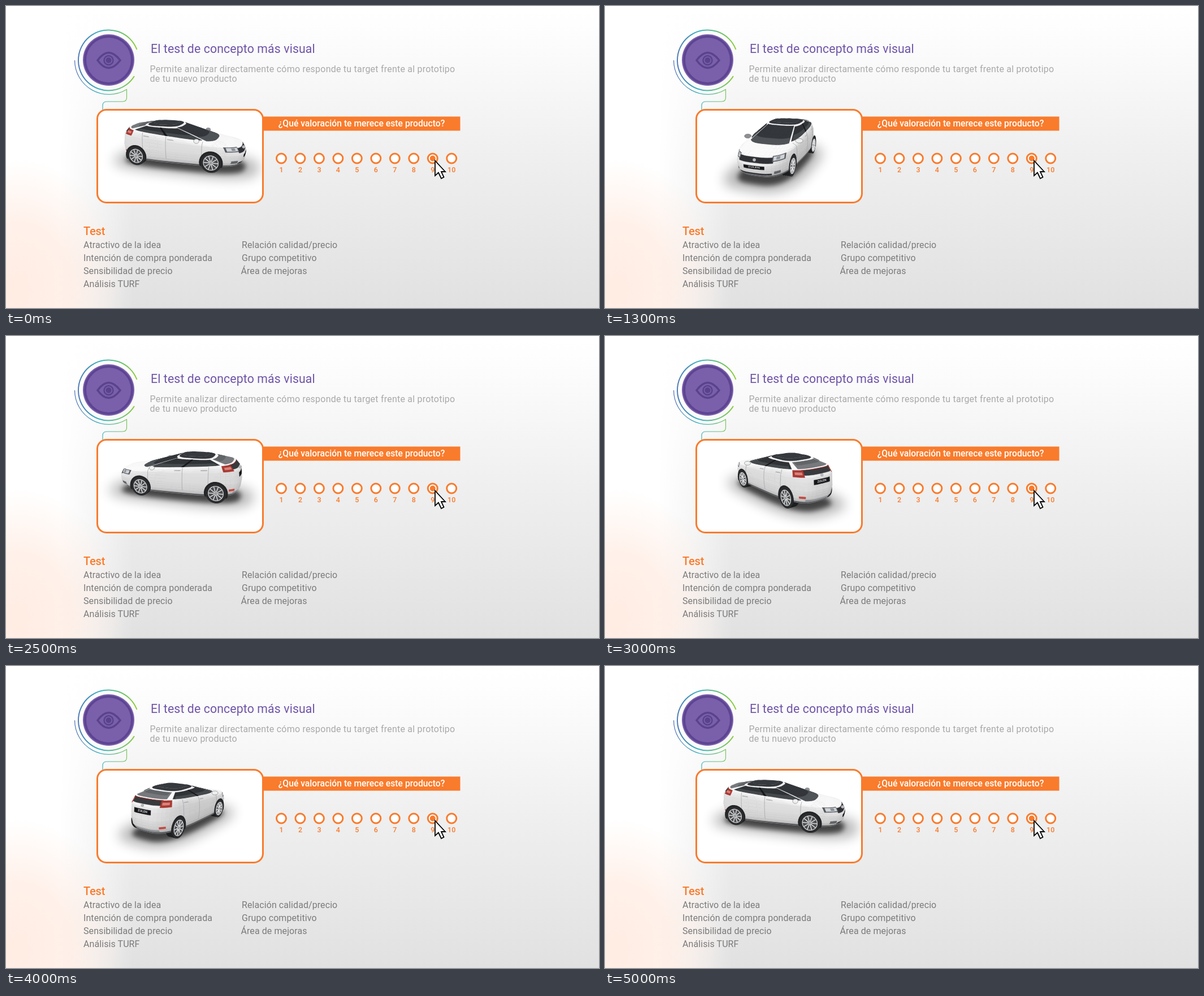
An HTML page for the animation above (5100 ms loop, 1049 px wide and 534 px high).

```html
<!DOCTYPE html>
<html lang="es">
<head>
<meta charset="utf-8">
<title>Test de concepto</title>
<style>
  html, body { margin: 0; width: 100%; height: 100%; overflow: hidden; background: #fff; }
  svg { display: block; width: 100%; height: 100%; font-family: Roboto, "Open Sans", sans-serif; }
  .list { font-size: 16px; fill: #7b7b7b; letter-spacing: .08px; }
  .intro { font-size: 16px; fill: #a9a9a9; letter-spacing: .22px; }
  .num { font-size: 12.5px; fill: #f97b2c; text-anchor: middle; font-weight: 500; }
</style>
</head>
<body>
<svg viewBox="0 0 1049 534">
  <defs>
    <linearGradient id="back" x2="0" y2="1">
      <stop offset="0" stop-color="#fff"/><stop offset=".06" stop-color="#fefefe"/>
      <stop offset=".5" stop-color="#efefef"/><stop offset="1" stop-color="#e1e1e1"/>
    </linearGradient>
    <linearGradient id="fade" gradientUnits="userSpaceOnUse" x1="95" x2="225">
      <stop offset="0" stop-color="#fff"/><stop offset="1" stop-color="#fff" stop-opacity="0"/>
    </linearGradient>
    <radialGradient id="glow">
      <stop offset="0" stop-color="#ffe9de" stop-opacity=".85"/>
      <stop offset=".5" stop-color="#ffe9de" stop-opacity=".65"/>
      <stop offset="1" stop-color="#ffeade" stop-opacity="0"/>
    </radialGradient>
    <linearGradient id="arc" gradientUnits="userSpaceOnUse" x1="121" x2="232">
      <stop offset="0" stop-color="#5070b4"/><stop offset=".42" stop-color="#40b4c0"/><stop offset="1" stop-color="#8dcb35"/>
    </linearGradient>
    <filter id="soft" x="-50%" y="-80%" width="200%" height="260%"><feGaussianBlur stdDeviation="4"/></filter>
    <filter id="wide" x="-50%" y="-80%" width="200%" height="260%"><feGaussianBlur stdDeviation="11"/></filter>
    <clipPath id="inside"><rect x="163" y="185" width="290" height="161" rx="14"/></clipPath>
  </defs>

  <rect width="1049" height="534" fill="url(#back)"/>
  <rect width="225" height="534" fill="url(#fade)"/>
  <ellipse cx="20" cy="500" rx="190" ry="230" fill="url(#glow)"/>

  <g fill="none" stroke="url(#arc)">
    <path d="M231.500 77A53.500 53.500 0 1 0 227 124" stroke-width="2"/>
    <path d="M121.500 96A60.500 60.500 0 0 0 213.500 147.500V162Q213.500 169 206 169H178Q171 169 171 176V183" stroke-width="1.200"/>
  </g>
  <circle cx="181.500" cy="95.500" r="45.500" fill="#7a5fab"/>
  <circle cx="181.500" cy="95.500" r="41.500" fill="none" stroke="#5d4492" stroke-width="4"/>
  <g fill="none" stroke="#5a438d" stroke-width="3.500">
    <path d="M162 96Q181.500 69 202 96Q181.500 123 162 96Z"/>
    <circle cx="181.500" cy="96" r="8" stroke-width="2.500"/>
  </g>
  <circle cx="181.500" cy="96" r="5" fill="#5a438d"/>

  <text x="256" y="83" font-size="21.300" letter-spacing=".1" fill="#6f54a8">El test de concepto más visual</text>
  <text class="intro" x="254.500" y="116.500">Permite analizar directamente cómo responde tu target frente al prototipo</text>
  <text class="intro" x="254.500" y="133.500">de tu nuevo producto</text>

  <rect x="161.500" y="183.500" width="293" height="164" rx="16" fill="#fff"/>
  <g id="car" clip-path="url(#inside)"></g>
  <rect x="161.500" y="183.500" width="293" height="164" rx="16" fill="none" stroke="#f97b2c" stroke-width="3"/>
  <rect x="455" y="195.500" width="348.500" height="25" fill="#f97b2c"/>
  <text x="629" y="213" font-size="15.700" font-weight="500" fill="#fff" text-anchor="middle">¿Qué valoración te merece este producto?</text>

  <g id="scale"></g>
  <circle cx="754.800" cy="269.500" r="5" fill="#f97b2c"/>
  <path d="M759 273.500V300L765 294.500L770 305L774.500 302.500L770 293H777Z" fill="#fff" stroke="#000" stroke-width="1.800"/>

  <text x="137" y="405" font-size="20" font-weight="500" letter-spacing="-.2" fill="#f97b2c">Test</text>
  <g class="list">
    <text x="137" y="428">Atractivo de la idea</text>
    <text x="137" y="451">Intención de compra ponderada</text>
    <text x="137" y="473.500">Sensibilidad de precio</text>
    <text x="137" y="496.500">Análisis TURF</text>
    <text x="417" y="428">Relación calidad/precio</text>
    <text x="417" y="451">Grupo competitivo</text>
    <text x="415.500" y="473.500">Área de mejoras</text>
  </g>
</svg>
<script>
const car = document.getElementById('car');
const rad = Math.PI / 180;

document.getElementById('scale').innerHTML = Array.from({ length: 10 }, (_, i) => {
  const x = 487 + 33.47 * i;
  return `<circle cx="${x}" cy="269.500" r="8.500" fill="#fff" stroke="#f97b2c" stroke-width="3"/>
    <text class="num" x="${x}" y="294">${i + 1}</text>`;
}).join('');

// Horizontal outlines of the body, low to high: rear x, front x, half width, rear z, front z
const rings = [
  [-1.92, 2.05, .80, .20, .19],
  [-2.05, 2.20, .88, .38, .34],
  [-2.08, 2.22, .91, .62, .58],
  [-2.03, 2.08, .90, 1.02, .82],
  [-1.84, 1.32, .84, 1.23, .95],
  [-1.20, .05, .60, 1.34, 1.34],
  [-.95, -.12, .44, 1.39, 1.39]
];
const POW = .62, FOCUS = 490, DIST = 10, CX = 311, CY = 274.5;
const AXLE = .33, WHEEL = .33;
const tiltS = Math.sin(18.5 * rad), tiltC = Math.cos(18.5 * rad);
let turnS, turnC, out;

const root = n => Math.sign(n) * Math.abs(n) ** POW;

function ringAt(v) {
  v = Math.max(0, Math.min(6, v));
  const i = Math.min(5, Math.floor(v)), k = v - i;
  return rings[i].map((n, j) => n + (rings[i + 1][j] - n) * k);
}

// Body surface: angle 0 is the nose, 90 the right side; v runs through the rings
function surf(angle, v) {
  const [xr, xf, w, zr, zf] = ringAt(v);
  const c = root(Math.cos(angle * rad));
  return [(xr + xf) / 2 + (xf - xr) / 2 * c, w * root(Math.sin(angle * rad)), zr + (zf - zr) * (c + 1) / 2];
}

// Angle at which the outline at height v reaches length x
function angleAt(x, v) {
  const [xr, xf] = ringAt(v);
  const c = (2 * x - xr - xf) / (xf - xr);
  return Math.acos(Math.sign(c) * Math.min(1, Math.abs(c)) ** (1 / POW)) / rad;
}

function project([x, r, z]) {
  const sx = x * turnC - r * turnS, d = x * turnS + r * turnC;
  const s = FOCUS / (DIST - d * tiltC - z * tiltS);
  return [CX + s * sx, CY - s * (z * tiltC - d * tiltS), s];
}

const path = pts => 'M' + pts.map(p => p[0].toFixed(1) + ' ' + p[1].toFixed(1)).join('L') + 'Z';
const area = pts => pts.reduce((sum, p, i) => {
  const q = pts[(i + 1) % pts.length];
  return sum + p[0] * q[1] - q[0] * p[1];
}, 0);
const draw = (d, fill, extra = '') => { if (d) out += `<path d="${d}" fill="${fill}" ${extra}/>`; };

const quad = (a0, a1, v0, v1) => [[a0, v0], [a1, v0], [a1, v1], [a0, v1]].map(p => project(surf(...p)));

function patch(a0, a1, v0, v1, fill, n = 8) {
  let d = '';
  for (let i = 0; i < n; i++) for (let j = 0; j < 2; j++) {
    const q = quad(a0 + (a1 - a0) * i / n, a0 + (a1 - a0) * (i + 1) / n,
      v0 + (v1 - v0) * j / 2, v0 + (v1 - v0) * (j + 1) / 2);
    if (area(q) > 0) d += path(q);
  }
  draw(d, fill, `stroke="${fill}" stroke-width=".4"`);
}

function pair(a0, a1, ...rest) {
  patch(a0, a1, ...rest);
  patch(-a1, -a0, ...rest);
}

function shade(a, v) {
  const diff = (p, q) => p.map((n, i) => n - q[i]);
  const t = diff(surf(a + 5, v), surf(a - 5, v)), u = diff(surf(a, v + .3), surf(a, v - .3));
  const n = [t[1] * u[2] - t[2] * u[1], t[2] * u[0] - t[0] * u[2], t[0] * u[1] - t[1] * u[0]];
  const len = Math.hypot(...n) || 1;
  const near = n[0] * turnS + n[1] * turnC, side = n[0] * turnC - n[1] * turnS;
  const g = Math.round(Math.min(250, 198 + (50 * n[2] + 19 * near - 10 * side) / len));
  return `rgb(${g},${g},${g + 1})`;
}

function shell(v0, v1) {
  const step = 7.5, rise = 1 / 3;
  for (let v = v0; v < v1 - .01; v += rise) for (let a = 0; a < 360; a += step) {
    const q = quad(a, a + step, v, v + rise);
    if (area(q) <= 0) continue;
    const fill = shade(a + step / 2, v + rise / 2);
    draw(path(q), fill, `stroke="${fill}" stroke-width=".7"`);
  }
}

function seam(x, v0, v1) {
  for (const side of [1, -1]) {
    const a = angleAt(x, (v0 + v1) / 2) * side;
    if (area(quad(a - 1, a + 1, v0, v1)) <= 0) continue;
    const pts = [0, 1, 2, 3, 4].map(i => {
      const v = v0 + (v1 - v0) * i / 4;
      return project(surf(angleAt(x, v) * side, v));
    });
    draw(path(pts).slice(0, -1), 'none', 'stroke="#a4a6a8" stroke-width=".8"');
  }
}

function disc(x, r, size, floor = -1) {
  return Array.from({ length: 28 }, (_, i) => {
    const a = i / 28 * 2 * Math.PI;
    return project([x + size * Math.cos(a), r, Math.max(floor, AXLE + size * Math.sin(a))]);
  });
}

const wheels = [[1.22, 1], [1.22, -1], [-1.38, 1], [-1.38, -1]];

function tyres() {
  for (const [x, side] of wheels)
    for (const r of [.6, .67, .74, .81]) draw(path(disc(x, r * side, WHEEL)), '#1d1e20');
}

function rims() {
  for (const [x, side] of wheels) {
    const r = .855 * side, arch = disc(x, r, .385, .2);
    if (area(arch) * side >= 0) continue;
    draw(path(arch), '#232426');
    draw(path(disc(x, r, WHEEL)), '#2b2c2e');
    draw(path(disc(x, r, .24)), '#4b4d50', 'stroke="#cfd1d3" stroke-width="1.300"');
    let spokes = '';
    for (let i = 0; i < 10; i++) {
      const a = i * 36 * rad;
      const end = project([x + .23 * Math.cos(a), r, AXLE + .23 * Math.sin(a)]);
      spokes += path([project([x, r, AXLE]), end]);
    }
    draw(spokes, 'none', 'stroke="#dcddde" stroke-width="1.500"');
    draw(path(disc(x, r, .05)), '#9a9c9f');
  }
}

function mirrors(front) {
  for (const side of [1, -1]) {
    if ((side * turnC > 0) !== front) continue;
    const [x, y, s] = project([.75, .9 * side, 1.02]);
    const rx = s * (.07 + .05 * Math.abs(turnS));
    out += `<ellipse cx="${x}" cy="${y}" rx="${rx}" ry="${s * .07}" fill="${front ? '#efeff0' : '#8d8f92'}" stroke="#6b6d70" stroke-width=".6"/>`;
  }
}

function plate(a, v0, v1) {
  patch(a - 11, a + 11, v0, v1, '#17181a', 4);
  const q = quad(a - 11, a + 11, v0, v1);
  if (area(q) < 60) return;
  const mid = (p, r) => [(p[0] + r[0]) / 2, (p[1] + r[1]) / 2];
  const left = mid(q[1], q[2]), right = mid(q[0], q[3]), low = mid(q[0], q[1]), high = mid(q[2], q[3]);
  const c = mid(low, high);
  const m = [(right[0] - left[0]) / 40, (right[1] - left[1]) / 40, (low[0] - high[0]) / 11, (low[1] - high[1]) / 11, ...c];
  out += `<text transform="matrix(${m})" y="2.600" font-size="7.500" font-weight="700" fill="#d8d8d8" text-anchor="middle">ZULEN</text>`;
}

function badge(a, v, fill) {
  if (area(quad(a - 6, a + 6, v - .1, v + .1)) < 10) return;
  const [x, y] = project(surf(a, v));
  out += `<circle cx="${x}" cy="${y}" r="2.800" fill="${fill}"/>`;
}

function shadow(k, opacity, filter) {
  const pts = Array.from({ length: 36 }, (_, i) => {
    const [x, r] = surf(i * 10, 1);
    return project([x * k, r * (k * 2 - 1), 0]);
  });
  draw(path(pts), '#000', `opacity="${opacity}" filter="url(#${filter})"`);
}

function render(step) {
  const turn = (17 + 7.2 * step) * rad;
  turnS = Math.sin(turn);
  turnC = Math.cos(turn);
  out = '';
  shadow(1.22, .3, 'wide');
  shadow(1.02, .62, 'soft');
  tyres();
  mirrors(false);

  shell(0, 4);
  patch(0, 360, 0, .25, '#55575a', 48);
  for (const x of [.92, -.28, -1.12]) seam(x, .8, 3.95);
  for (const x of [-.22, -1.08]) pair(angleAt(x + .2, 3.4), angleAt(x, 3.4), 3.35, 3.45, '#aeb0b2', 2);
  // Nose
  patch(-25, 25, 2.25, 2.85, '#303236', 12);
  pair(23, 50, 2.42, 3.02, '#54575b');
  pair(25, 47, 2.52, 2.94, '#cfd3d7');
  pair(31, 38, 2.6, 2.88, '#8b9096', 3);
  patch(-24, 24, .5, .95, '#303235');
  pair(29, 42, .75, 1.2, '#616468', 4);
  plate(0, 1.5, 1.9);
  badge(0, 2.55, '#b9bbbe');
  // Tail
  patch(152, 208, 3.3, 3.94, '#393a3d', 12);
  pair(132, 153, 3.05, 3.94, '#a83a34');
  pair(136, 150, 3.35, 3.65, '#d8857d', 4);
  patch(150, 210, 3.92, 4, '#8f2f2b', 12);
  pair(142, 154, 1, 1.25, '#c4473d', 4);
  patch(155, 205, .3, .7, '#8b8d90');
  plate(180, 2.45, 2.8);
  badge(180, 3.1, '#b4b6b8');
  rims();

  shell(4, 6);
  patch(-42, 42, 4.03, 4.96, '#34373b', 14);
  patch(-42, 42, 4.03, 4.3, '#505458', 14);
  pair(48, 131, 4.08, 4.9, '#303337', 20);
  pair(52, 126, 4.08, 4.4, '#46494d', 20);
  pair(89.8, 90.2, 4.06, 4.9, '#17181a', 2);
  patch(144, 216, 4.1, 4.92, '#77797d', 14);
  patch(150, 210, 4.55, 4.92, '#626569', 14);
  patch(0, 360, 5.25, 6, '#36393d', 48);
  draw(path(Array.from({ length: 48 }, (_, i) => project(surf(i * 7.5, 6)))), '#36393d');
  mirrors(true);
  car.innerHTML = out;
}

let shown = -1;
function tick(now) {
  const step = Math.floor(now % 5100 / 100);
  if (step !== shown) render(shown = step);
  requestAnimationFrame(tick);
}
tick(performance.now());
</script>
</body>
</html>
```
